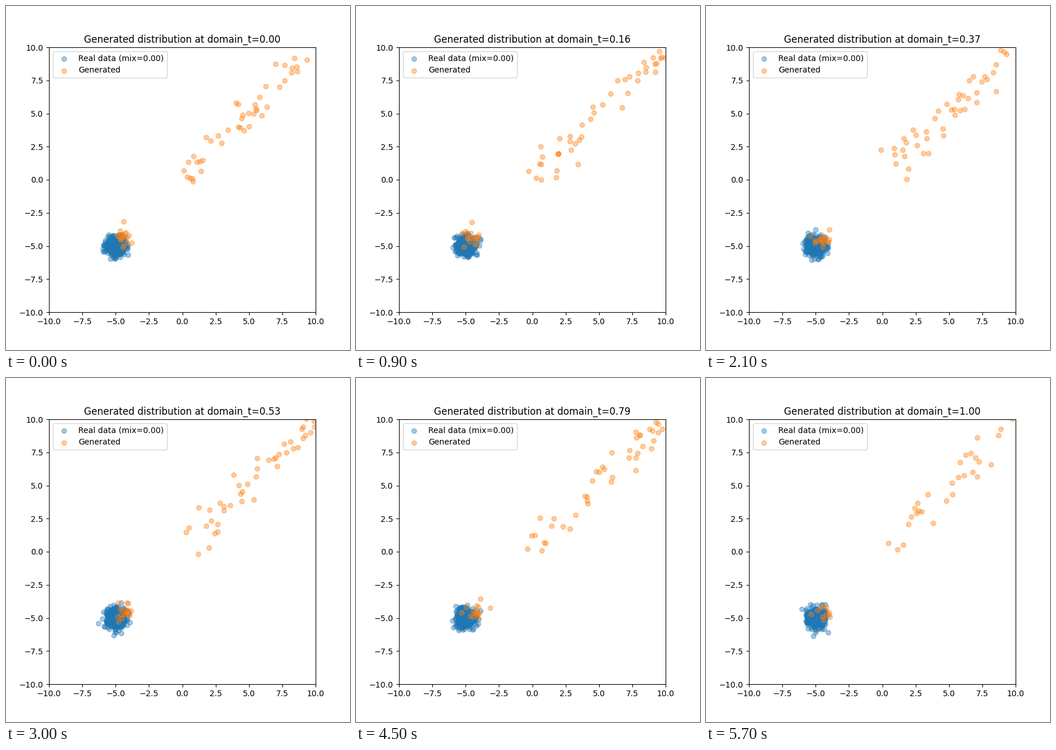
A matplotlib script for the animation above (6 s loop, 600 by 600 pixels).

```python
import numpy as np
import matplotlib.pyplot as plt
from matplotlib.animation import FuncAnimation

FRAMES = 20
INTERVAL = 300
REAL_COUNT = 500

fig, ax = plt.subplots(figsize=(6, 6), dpi=100)


def real_points(rng):
    return rng.normal(-5, 0.34, (REAL_COUNT, 2))


def generated_points(rng, t):
    """Samples along the diagonal plus a small group beside the real data."""
    fade = t ** 8
    n_line = int(46 - 16 * fade)
    n_group = int(18 - 7 * fade)

    along = 0.2 + 10 * rng.random(n_line) ** 1.1 + rng.normal(0, 0.3, n_line)
    across = rng.normal(0, 1, n_line) * (0.54 - 0.022 * along)
    line = np.column_stack([along - across, along + across])

    group = rng.normal((-4.45, -4.55), (0.36, 0.33), (n_group, 2))
    group[0] += rng.uniform(0, 1.1, 2)
    return np.vstack([line, group])


def draw(i):
    t = i / (FRAMES - 1)
    rng = np.random.default_rng(70 + i)
    ax.clear()
    ax.scatter(*real_points(rng).T, alpha=0.4, label="Real data (mix=0.00)")
    ax.scatter(*generated_points(rng, t).T, alpha=0.4, label="Generated")
    ax.set_xlim(-10, 10)
    ax.set_ylim(-10, 10)
    ax.set_title(f"Generated distribution at domain_t={t:.2f}")
    ax.legend(loc="upper left")
    return ax.collections


anim = FuncAnimation(fig, draw, frames=FRAMES, interval=INTERVAL,
                     init_func=lambda: draw(0), repeat=True, repeat_delay=0)
plt.show()
```
